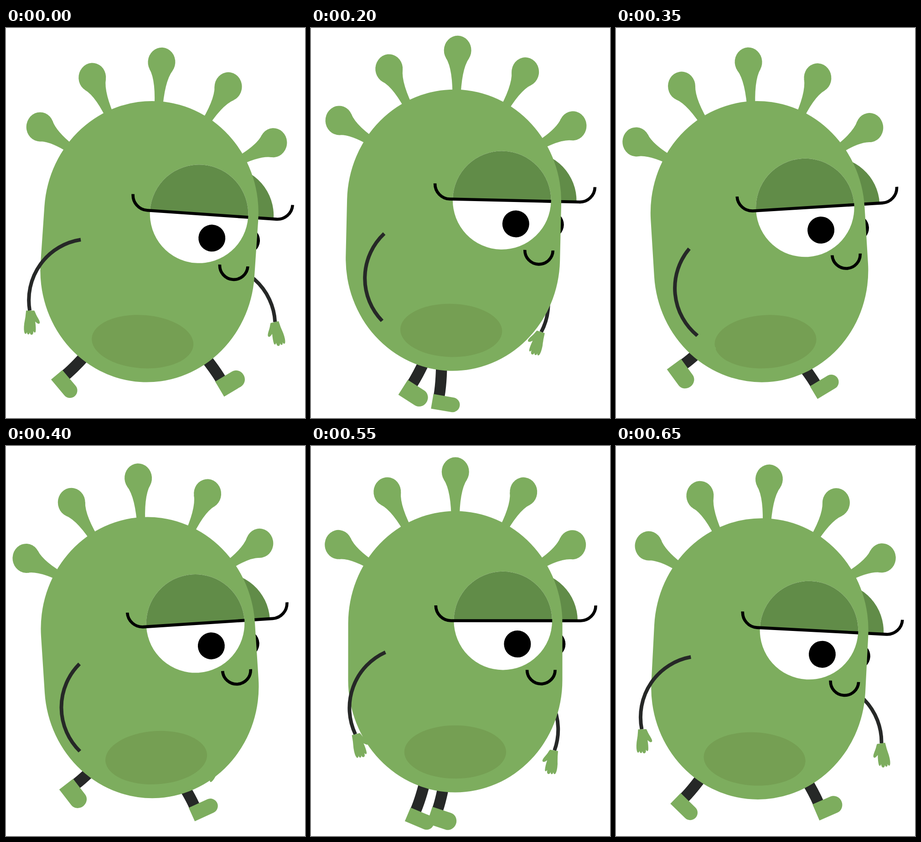
An HTML page for the animation above (0.7 s loop, 656 by 854 pixels).

```html
<!DOCTYPE html>
<html lang="en">
<head>
<meta charset="utf-8">
<title>Walking microbe</title>
<style>
  html, body { margin: 0; width: 100%; height: 100%; overflow: hidden; background: #fff; }
  svg { display: block; }
  .skin { fill: #7dad5e; }
  .lid { fill: #618c48; }
  .limb { fill: none; stroke: #262827; }
  .line { fill: none; stroke: #000; stroke-width: 6.6; }
</style>
</head>
<body>
<svg width="656" height="854" viewBox="0 0 656 854">
  <defs>
    <g id="stalk" class="skin">
      <circle r="32"/>
      <path d="M-27 17Q-9.5 42-9.5 110H9.5Q9.5 42 27 17z"/>
    </g>
    <g id="eye">
      <circle r="107.8" fill="#fff"/>
      <path class="lid" d="M-107.8 0a107.8 107.8 0 0 1 215.6 0z"/>
      <path class="line" d="M108 0H-114a33.5 33.5 0 0 1-33.5-33.5"/>
    </g>
    <g id="arm">
      <path class="limb" stroke-width="8" d="M0 0A134 134 0 0 0 0 191.4"/>
      <path class="skin" transform="translate(0 191.4) rotate(-35.8)"
        d="M-8 0H10L12 4C15 13 23 22 22 27Q20 32 12 24Q14 38 13 46Q11 51 8 45Q8 53 4 53Q1 53 0 48Q-1 53-4 52Q-6 51-6 47Q-8 53-11 50Q-14 44-12 28Q-9 14-8 0z"/>
    </g>
    <path id="leg" class="limb" stroke-width="24.5" d="M0 2Q0-30-8-78"/>
  </defs>
  <g id="farLeg">
    <use href="#leg"/>
    <path class="skin" d="M-13 0H32a16.2 16.2 0 0 1 0 32.4H-13z"/>
  </g>
  <g id="nearLeg">
    <use href="#leg"/>
    <path class="skin" d="M-13 0H30a18 19.2 0 0 1 0 38.4H-13z"/>
  </g>
  <g id="body">
    <use id="farArm" href="#arm"/>
    <use href="#eye" transform="translate(160.6 -68) scale(-1 1)"/>
    <circle cx="212.3" cy="-17" r="29.5"/>
    <g id="stalks"></g>
    <rect class="skin" x="-235" y="-308" width="470" height="616" rx="235" ry="246"/>
    <ellipse cy="219.5" rx="111.7" ry="58.3" fill="#759f53"/>
    <use href="#eye" transform="translate(104.6 -68)"/>
    <circle cx="136.3" cy="-17" r="29.5"/>
    <path class="line" d="M157.5 39.5a30.8 30.8 0 0 0 61.6 0"/>
    <use id="nearArm" href="#arm"/>
  </g>
</svg>
<script>
const LOOP = 700, STEP = 50;
const { sin, cos, PI } = Math;

const pose = (id, transform) => document.getElementById(id).setAttribute('transform', transform);

// Each foot hangs from a hidden hip and flexes further than its leg swings
const leg = (id, x, y, length, swing, flex) =>
  pose(id, `translate(${x} ${y}) rotate(${swing}) translate(0 ${length}) rotate(${swing * flex + 4})`);

function draw(time) {
  const p = time / LOOP * 2 * PI;
  // Sum of harmonics, each given as [cosine, sine]
  const wave = (mean, ...terms) =>
    terms.reduce((sum, [c, s = 0], i) => sum + c * cos((i + 1) * p) + s * sin((i + 1) * p), mean);

  const lean = wave(0.45, [3.7, 1.5], [-0.25]);
  const x = wave(314.6, [0, -2]);
  const bob = wave(456.6, [1.6, -2.6], [11.2, -0.3], [-1.6]);
  pose('body', `translate(${x} ${bob}) rotate(${lean})`);

  leg('nearLeg', 335.5, 500.5, 299, wave(11.75, [-30.5], [-6, 1.5], [-2]), 0.3);
  leg('farLeg', 303.5, 459.5, 345, wave(6.25, [26.25, 1.6], [-2.7, 1.7]), 0.54);

  const nearSwing = wave(13, [19.4, -6], [2.2, 0.6], [1.2]);
  const farSwing = wave(23.3, [22], [1.8], [1.6]);
  pose('nearArm', `translate(${wave(-152.5, [2, 1.2])} ${wave(6, [0, 5])}) rotate(${nearSwing - lean})`);
  pose('farArm', `translate(135 ${wave(40.5, [0, -3])}) rotate(${-lean}) scale(-1 1) rotate(${farSwing})`);
}

const stalk = (x, y, angle) =>
  `<use href="#stalk" transform="translate(${x} ${y}) scale(.9375 1) rotate(${angle})"/>`;
document.getElementById('stalks').innerHTML = stalk(0, -394, 0)
  + [-1, 1].map(side => stalk(side * 149.5, -350, side * 30) + stalk(side * 256.5, -234.5, side * 60)).join('');

function frame() {
  draw(Math.floor(performance.now() % LOOP / STEP) * STEP);
  requestAnimationFrame(frame);
}
frame();
</script>
</body>
</html>
```
